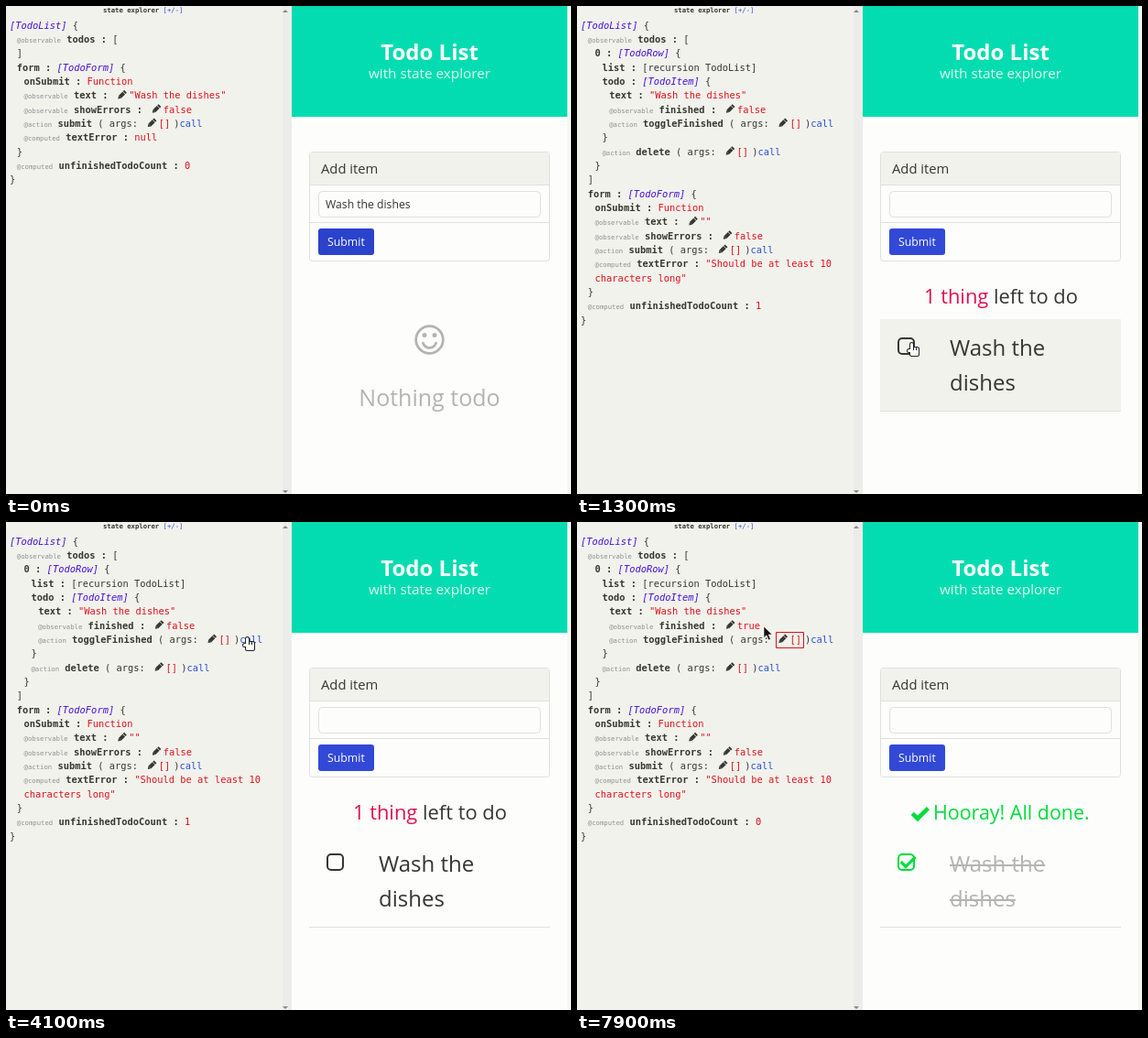
An HTML page with a canvas that plays this animation: 617x533 px, repeating every 8 s.

```html
<!DOCTYPE html>
<html lang="en">
<head>
<meta charset="utf-8">
<title>Todo list with state explorer</title>
<style>
html, body { margin: 0; width: 100%; height: 100%; overflow: hidden; background: #fdfdfc; }
canvas { display: block; }
</style>
</head>
<body>
<canvas id="stage" width="617" height="533"></canvas>
<script>
const ctx = document.getElementById('stage').getContext('2d');
const LOOP = 8000, STEP = 100;
const MONO = '"DejaVu Sans Mono", monospace';
const SANS = '"Open Sans", "Noto Sans", sans-serif';
const CODE = 10.4, SMALL = CODE * 0.7, LINE = 15.33, INDENT = 7.8;
const MID = 462.5;
const C = {
  page: '#fdfdfc', panel: '#f2f2ed', line: '#dfdfdd', teal: '#03dcb0', white: '#fdfffa',
  ink: '#363632', grey: '#b4b4b0', red: '#e01018', pink: '#e01050', green: '#00dd3c',
  blue: '#2850d4', button: '#3249d8', type: '#4410d8'
};

const BUTTON = { x: 341, y: 243, w: 61, h: 29 };
const CHECKBOX = { x: 350, y: 362, w: 19, h: 19 };
const CALL = { x: 255, y: 120, w: 27, h: 17 };
const ROW = { x: 331, y: 342, w: 263, h: 100 };
const inside = (p, r) => !!p && p.x >= r.x && p.x < r.x + r.w && p.y >= r.y && p.y < r.y + r.h;

// The pointer rests at each stop and eases to the next
const STOPS = [
  { from: 500, to: 500, x: 388, y: 265 },
  { from: 1300, to: 1800, x: 365, y: 367 },
  { from: 2100, to: 2600, x: 345, y: 343 },
  { from: 4100, to: 5200, x: 263, y: 125 },
  { from: 6100, to: 6200, x: 178, y: 108 },
  { from: 6900, to: 7600, x: 263, y: 125 },
  { from: 7900, to: LOOP, x: 204, y: 114 }
];

const smooth = k => k * k * (3 - 2 * k);

function cursorAt(t) {
  const a = STOPS.findLast(stop => stop.from <= t);
  if (!a || t <= a.to) return a;
  const b = STOPS[STOPS.indexOf(a) + 1];
  const k = smooth((t - a.to) / (b.from - a.to));
  return { x: Math.round(a.x + (b.x - a.x) * k), y: Math.round(a.y + (b.y - a.y) * k) };
}

function rect(x, y, w, h, color) {
  ctx.fillStyle = color;
  ctx.fillRect(x, y, w, h);
}

function paint(fill, stroke, width = 1) {
  if (fill) { ctx.fillStyle = fill; ctx.fill(); }
  if (stroke) { ctx.strokeStyle = stroke; ctx.lineWidth = width; ctx.stroke(); }
}

function rounded({ x, y, w, h }, radius, fill, stroke, width) {
  ctx.beginPath();
  ctx.roundRect(x, y, w, h, radius);
  paint(fill, stroke, width);
}

const grow = ({ x, y, w, h }, d) => ({ x: x - d, y: y - d, w: w + 2 * d, h: h + 2 * d });

function path(points, fill, stroke, width) {
  ctx.beginPath();
  points.forEach(([x, y]) => ctx.lineTo(x, y));
  if (fill) ctx.closePath();
  paint(fill, stroke, width);
}

function arc(x, y, r, from, to, fill, stroke, width) {
  ctx.beginPath();
  ctx.arc(x, y, r, from, to);
  paint(fill, stroke, width);
}

// Draws text and returns the x where it ends
function text(str, x, y, font, color, align = 'left') {
  ctx.font = font;
  ctx.fillStyle = color;
  ctx.textAlign = align;
  ctx.fillText(str, x, y);
  return x + ctx.measureText(str).width;
}

const sans = (str, x, y, size, color, align, weight = 400) =>
  text(str, x, y, `${weight} ${size}px ${SANS}`, color, align);

function pencil(x, y) {
  ctx.save();
  ctx.translate(x, y);
  ctx.rotate(-Math.PI / 4);
  path([[0, 0], [3, -2], [3, 2]], C.ink);
  rect(3, -2, 6, 4, C.ink);
  rect(9.6, -2, 2, 4, C.ink);
  ctx.restore();
}

const plain = str => ['plain', str], value = str => ['value', str];
const type = str => ['type', `[${str}]`], edit = str => ['edit', str];
const key = name => ['bold', name + ' : '];
const obs = ['small', '@observable'], act = ['small', '@action'], comp = ['small', '@computed'];
const method = (name, hot) =>
  [act, ['bold', name], plain(' ( args: '), [hot ? 'hot' : 'edit', '[]'], plain(')'), ['call', 'call']];

function stateRows(s) {
  const item = [
    [2, key('0'), type('TodoRow'), plain(' {')],
    [3, key('list'), plain('[recursion TodoList]')],
    [3, key('todo'), type('TodoItem'), plain(' {')],
    [4, key('text'), value('"Wash the dishes"')],
    [4, obs, key('finished'), edit(String(s.done))],
    [4, ...method('toggleFinished', s.hotArgs)],
    [3, plain('}')],
    [3, ...method('delete')],
    [2, plain('}')]
  ];
  const error = s.added ? ['"Should be at least 10', 'characters long"'] : ['null'];
  return [
    [0, type('TodoList'), plain(' {')],
    [1, obs, key('todos'), plain('[')],
    ...(s.added ? item : []),
    [1, plain(']')],
    [1, key('form'), type('TodoForm'), plain(' {')],
    [2, key('onSubmit'), value('Function')],
    [2, obs, key('text'), edit(s.added ? '""' : '"Wash the dishes"')],
    [2, obs, key('showErrors'), edit('false')],
    [2, ...method('submit')],
    [2, comp, key('textError'), value(error[0])],
    ...error.slice(1).map(rest => [2, value(rest)]),
    [1, plain('}')],
    [1, comp, key('unfinishedTodoCount'), value(s.added && !s.done ? '1' : '0')],
    [0, plain('}')]
  ];
}

const STYLE = {
  plain: ['', C.ink], bold: ['bold ', C.ink], type: ['italic ', C.type],
  value: ['', C.red], call: ['', C.blue]
};

function drawPart([kind, str], x, y) {
  if (kind === 'small') return text(str, x, y, `${SMALL}px ${MONO}`, '#909090') + CODE * 0.602;
  if (kind === 'edit' || kind === 'hot') {
    pencil(x + 4.5, y);
    if (kind === 'hot') rounded({ x: Math.round(x) + 1.5, y: Math.round(y) - 11.5, w: 30, h: 17 }, 0, null, C.red);
    return text(str, x + 16.5, y, `${CODE}px ${MONO}`, C.red) + 4;
  }
  const [face, color] = STYLE[kind];
  return text(str, x, y, `${face}${CODE}px ${MONO}`, color);
}

function drawExplorer(s) {
  rect(0, 0, 312, 533, C.panel);
  rect(302, 0, 10, 533, '#ececea');
  path([[302, 7], [305, 4], [308, 7]], '#888');
  path([[302, 529], [305, 532], [308, 529]], '#888');
  const end = text('state explorer ', 106, 7, `bold ${SMALL}px ${MONO}`, C.ink);
  text('[+/-]', end, 7, `${SMALL}px ${MONO}`, C.blue);
  stateRows(s).forEach(([indent, ...parts], i) =>
    parts.reduce((x, part) => drawPart(part, x, 24.8 + i * LINE), 4 + indent * INDENT));
}

function drawForm(s) {
  rounded({ x: 331.5, y: 159.5, w: 262, h: 119 }, 3, C.page, C.line);
  rect(332, 160, 261, 35, C.panel);
  rect(332, 195, 261, 1, C.line);
  rect(332, 236, 261, 1, C.line);
  sans('Add item', 344, 183, 14.8, C.ink);
  rounded({ x: 341.5, y: 202.5, w: 242, h: 28 }, 4, C.page, C.line);
  if (!s.added) sans('Wash the dishes', 349, 221, 12.2, C.ink);
  if (s.ring) rounded(grow(BUTTON, 1), 4, null, '#aab6ee', 2);
  rounded(BUTTON, 3, s.active ? '#2a42cc' : C.button);
  sans('Submit', 351, 262, 12.3, C.white);
}

function drawSmile() {
  const y = 364.5;
  arc(MID, y, 14.8, 0, 7, null, C.grey, 2.8);
  for (const side of [-1, 1]) arc(MID + side * 5.5, y - 5, 2.5, 0, 7, C.grey);
  ctx.lineCap = 'round';
  arc(MID, y + 1.5, 7.4, 0.3, Math.PI - 0.3, null, C.grey, 2.8);
  ctx.lineCap = 'butt';
}

// Check mark whose lower corner sits at x, y
const tick = (x, y, size, width) =>
  path([[x - size, y - size], [x, y], [x + size * 2, y - size * 2]], null, C.green, width);

function drawTodo(s) {
  if (s.hoverRow) rect(ROW.x, ROW.y, ROW.w, ROW.h, C.panel);
  rect(ROW.x, ROW.y + ROW.h, ROW.w, 1, C.line);
  rounded(grow(CHECKBOX, -1), 4, null, s.done ? C.green : C.ink, 2);
  if (s.done) {
    tick(372, 324, 5.7, 4.6);
    tick(359, 376.5, 5.3, 3.2);
    sans('Hooray! All done.', 389, 325, 21.4, C.green);
  } else {
    const end = sans('1 thing', 379, 325, 21.9, C.pink);
    sans(' left to do', end, 325, 21.9, C.ink);
  }
  const color = s.done ? C.grey : C.ink;
  ['Wash the', 'dishes'].forEach((word, i) => {
    const y = 382 + i * 38;
    const end = sans(word, 407, y, 24, color);
    if (s.done) rect(407, y - 8, end - 407, 2, color);
  });
}

function drawApp(s) {
  rect(312, 0, 301, 533, C.page);
  rect(613, 0, 4, 533, '#f6f6f3');
  rect(312, 0, 301, 121, C.teal);
  sans('Todo List', MID, 59, 24, C.white, 'center', 700);
  sans('with state explorer', MID, 79, 15.3, '#e0fbf2', 'center');
  drawForm(s);
  if (s.added) return drawTodo(s);
  drawSmile();
  sans('Nothing todo', MID, 437, 25, C.grey, 'center');
}

function drawHand() {
  const finger = { x: -1, y: 1, w: 3, h: 10 };
  const palm = { x: -1, y: 6, w: 9, h: 9 };
  const thumb = { x: -4, y: 8, w: 5, h: 3 };
  const parts = [finger, palm, thumb];
  parts.forEach(part => rounded(grow(part, 1), 2.5, '#222'));
  parts.forEach(part => rounded(part, 1.5, '#fff'));
  for (const x of [2, 5]) rect(x, 6, 1, 3, '#222');
}

function drawArrow() {
  path([[0, 0], [0, 12.5], [3, 9.8], [5.2, 15], [7.4, 14], [5.2, 9], [9.2, 9]], '#111', '#fff', 0.6);
}

function drawCursor(p) {
  ctx.save();
  ctx.translate(p.x, p.y);
  if ([BUTTON, CHECKBOX, CALL].some(area => inside(p, area))) drawHand();
  else drawArrow();
  ctx.restore();
}

function render(t) {
  const cursor = cursorAt(t);
  const added = t >= 100, overButton = inside(cursor, BUTTON);
  const state = {
    added,
    done: (t >= 4300 && t < 4800) || t >= 7100,
    hotArgs: t >= 7700,
    active: !added || overButton,
    ring: added && (!cursor || overButton),
    hoverRow: inside(cursor, ROW)
  };
  drawExplorer(state);
  drawApp(state);
  if (cursor) drawCursor(cursor);
}

const start = performance.now();
function frame() {
  const t = (performance.now() - start) % LOOP;
  render(Math.floor(t / STEP) * STEP);
  requestAnimationFrame(frame);
}
frame();
</script>
</body>
</html>
```
